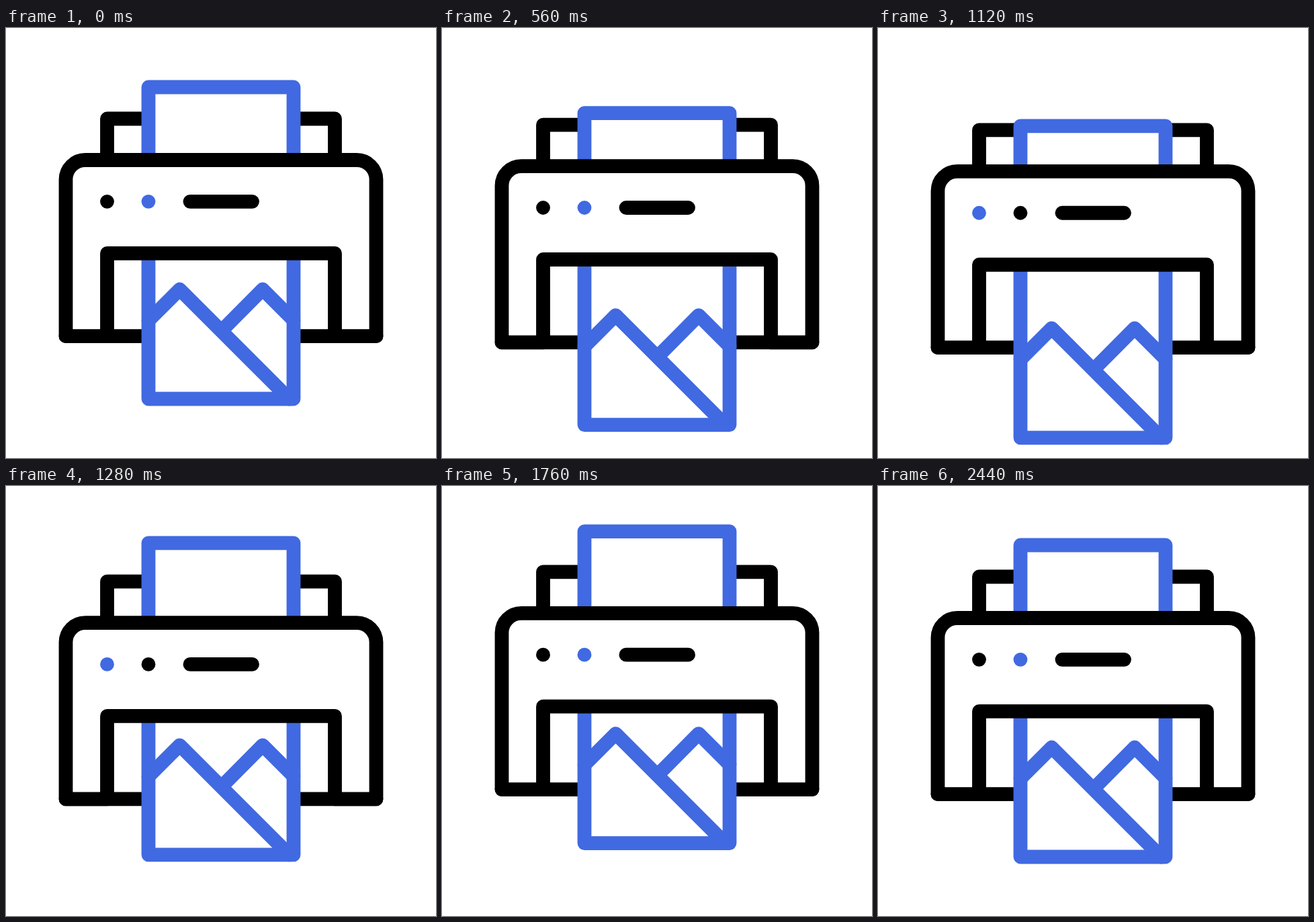
These frames come from a looping animation (640x640 px, 2640 ms). An HTML page:

```html
<!DOCTYPE html>
<html lang="en">
<head>
<meta charset="utf-8">
<title>Printer</title>
<style>
  html, body { margin: 0; height: 100%; overflow: hidden; background: #fff; }
  svg { display: block; width: 100vw; height: 100vh; }
  path { fill: none; stroke: #000; stroke-width: 20.8; stroke-linecap: round; stroke-linejoin: round; }
  .solid { fill: #fff; }
  #paper path { stroke: #4169e1; }
</style>
</head>
<body>
<svg viewBox="0 0 640 640">
  <g class="body">
    <path d="M150.5 196.5V135H489.5V196.5M89 458.7H212M428 458.7H551"/>
  </g>
  <g id="paper">
    <path class="solid" d="M212 88H428V552H212Z"/>
    <path d="M212 435.5L258.5 389L421.5 552M320.5 451L382 389L428 435"/>
  </g>
  <g class="body">
    <path class="solid" d="M89 458.7V225.5a29 29 0 0 1 29-29H522a29 29 0 0 1 29 29V458.7H489.5V335.3H150.5V458.7Z"/>
    <path d="M274 258.3H366.5"/>
    <circle id="left" cx="150.5" cy="258.3" r="10.4"/>
    <circle id="right" cx="212" cy="258.3" r="10.4"/>
  </g>
</svg>
<script>
  const LOOP = 2640, STEP = 40;
  // [time in ms, vertical offset]
  const paperKeys = [[235, 0], [825, 67], [1048, 67], [1498, -67], [1520, -67], [1956, 14], [2400, 0]];
  const bodyKeys = [[225, 0], [860, 17], [1110, 17], [1500, -7.5], [1680, -7.5], [2280, 0]];

  const paper = document.getElementById('paper');
  const bodies = document.querySelectorAll('.body');
  const left = document.getElementById('left');
  const right = document.getElementById('right');

  function offsetAt(keys, t) {
    const next = keys.findIndex(key => key[0] > t);
    if (next < 1) return 0;
    const [t0, a] = keys[next - 1], [t1, b] = keys[next];
    const u = (t - t0) / (t1 - t0);
    return a + (b - a) * u * u * (3 - 2 * u);
  }

  function shift(el, y) {
    el.setAttribute('transform', `translate(0 ${y.toFixed(2)})`);
  }

  const start = performance.now();
  function draw() {
    const t = Math.floor((performance.now() - start) % LOOP / STEP) * STEP;
    shift(paper, offsetAt(paperKeys, t));
    bodies.forEach(el => shift(el, offsetAt(bodyKeys, t)));
    const leftLit = (t >= 900 && t < 1340) || (t >= 1780 && t < 2220);
    left.setAttribute('fill', leftLit ? '#4169e1' : '#000');
    right.setAttribute('fill', leftLit ? '#000' : '#4169e1');
    requestAnimationFrame(draw);
  }
  draw();
</script>
</body>
</html>
```
